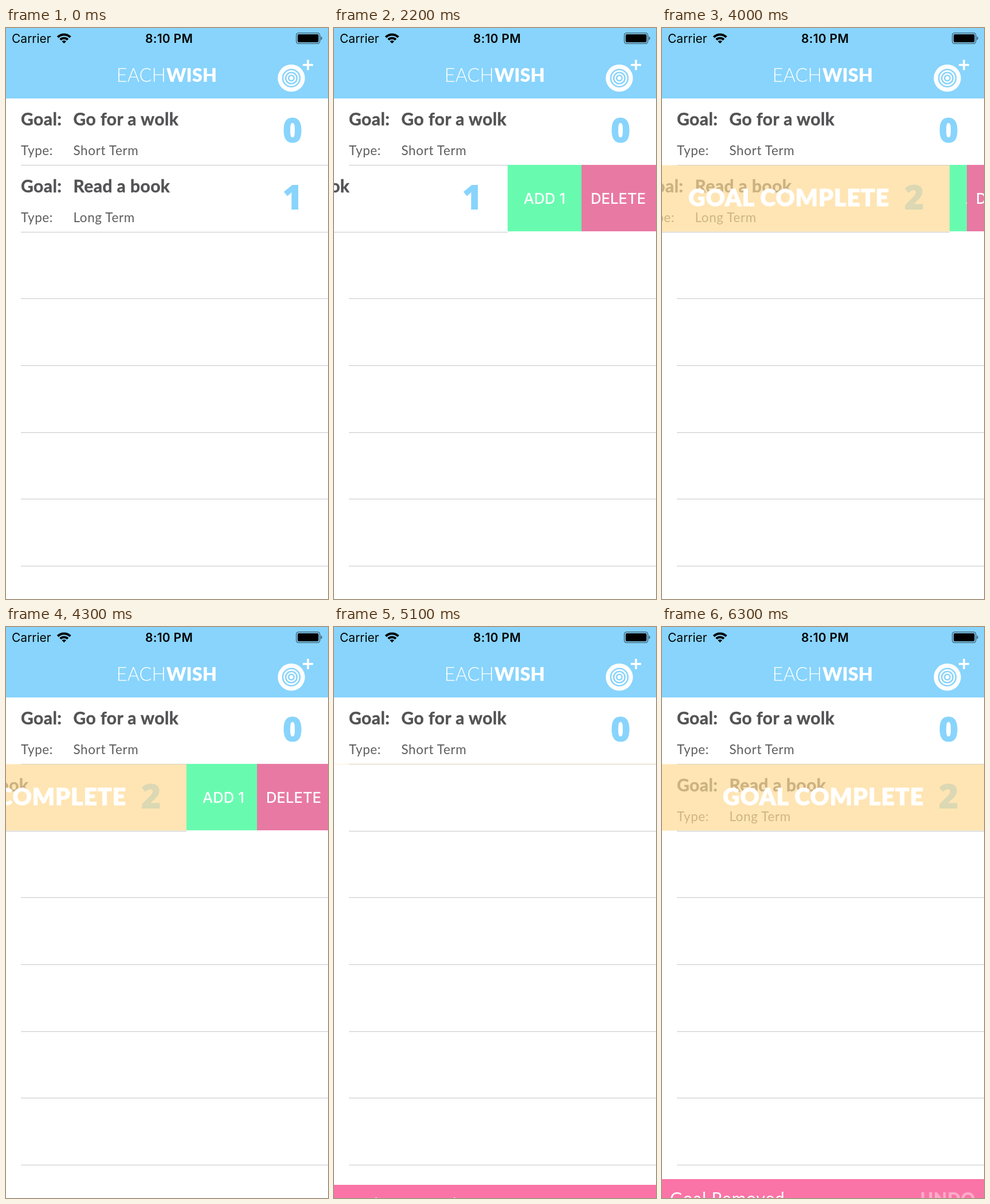
Animation of 562 by 997 pixels, one loop 6400 ms. Source, as an HTML page:

```html
<!DOCTYPE html>
<html lang="en">
<head>
<meta charset="utf-8">
<title>Goal list</title>
<style>
  html, body { margin: 0; width: 100%; height: 100%; overflow: hidden; background: #fff; }
  svg { display: block; width: 562px; height: 997px; }
  text { font-family: Lato, "Open Sans", sans-serif; white-space: pre; }
  .ui { font-family: Inter, Roboto, sans-serif; font-size: 21px; }
  .sky { fill: #88d4fc; }
  .title { font-size: 32.5px; fill: #fff; }
  .name { font-size: 30px; font-weight: 700; letter-spacing: .45px; fill: #535355; stroke: #535355; stroke-width: .5; }
  .type { font-size: 22.5px; letter-spacing: .6px; fill: #5e5e60; }
  .count { font-family: "Open Sans", "Noto Sans", sans-serif; font-size: 60px; font-weight: 800; text-anchor: middle; }
  .banner { font-size: 41px; font-weight: 900; letter-spacing: .9px; text-anchor: middle; fill: #fff; stroke: #fff; stroke-width: .9; }
  .action { font-size: 25.7px; font-weight: 500; fill: #fff; }
  .toast { font-size: 30px; letter-spacing: .8px; fill: #fff; }
  .rule { fill: #c8c7cc; }
</style>
</head>
<body>
<svg viewBox="0 0 562 997">
  <rect width="562" height="997" fill="#fff"/>
  <g id="rules"></g>

  <g id="walk"></g>
  <g id="book"></g>
  <g id="done"></g>

  <g id="cover">
    <rect id="blank" y="240" width="562" fill="#fff"/>
    <rect id="edge" class="rule" x="26" width="536" height="1"/>
  </g>

  <g id="add">
    <rect y="239" width="562" height="116" fill="#68fbb0"/>
    <text class="ui action" x="28" y="307">ADD 1</text>
  </g>
  <g id="del">
    <rect y="239" width="562" height="116" fill="#e879a3"/>
    <text class="ui action" x="16" y="307">DELETE</text>
  </g>

  <g id="toast">
    <rect y="932" width="562" height="65" fill="#fb74a7"/>
    <text class="toast" x="14" y="977">Goal Removed</text>
    <text id="undo" class="toast" x="547" y="977" text-anchor="end" font-weight="900">UNDO</text>
  </g>

  <rect class="sky" width="562" height="123"/>
  <text class="ui" x="10" y="26">Carrier</text>
  <text class="ui" x="284.5" y="26" text-anchor="middle" font-weight="600" letter-spacing=".3">8:10 PM</text>
  <g transform="translate(101.3 27)">
    <g fill="none" stroke="#000" stroke-width="4">
      <path d="M-11 -11a15.6 15.6 0 0 1 22 0"/>
      <path d="M-6.6 -6.6a9.4 9.4 0 0 1 13.2 0"/>
    </g>
    <path d="M0 0l-3.8 -3.8a5.4 5.4 0 0 1 7.6 0z"/>
  </g>
  <rect x="506.7" y="8.7" width="41" height="18.6" rx="4" fill="none" stroke="#000" stroke-opacity=".5" stroke-width="1.5"/>
  <rect x="509" y="11" width="36.5" height="14" rx="2"/>
  <path d="M549.3 14.5q2.6 1 2.6 3.5t-2.6 3.5z" fill-opacity=".5"/>
  <text class="title" x="279" y="94" text-anchor="end" font-weight="300">EACH</text>
  <text class="title" x="280" y="94" font-weight="900">WISH</text>
  <circle cx="498" cy="87.5" r="23.7" fill="#fff"/>
  <g fill="none" stroke="#88d4fc" stroke-width="2.6">
    <circle cx="498" cy="87.5" r="15"/>
    <circle cx="498" cy="87.5" r="9.8"/>
    <circle cx="498" cy="87.5" r="4.8"/>
  </g>
  <path d="M518 64.5h18M527 55.5v18" stroke="#fff" stroke-width="3.6"/>
</svg>

<script>
  const LOOP = 6400, STEP = 100, OPEN = 260, ROW = 116.65;
  const $ = id => document.getElementById(id);
  const rule = y => `<rect class="rule" x="26" y="${y}" width="536" height="1"/>`;

  const row = (dy, name, type, count) => `
    <g transform="translate(0 ${dy})">
      <text class="name" x="26" y="170">Goal:</text>
      <text class="name" x="117.5" y="170">${name}</text>
      <text class="type" x="26" y="222">Type:</text>
      <text class="type" x="117.5" y="222">${type}</text>
      <text class="count sky" x="500" y="200">${count}</text>
    </g>` + rule(239 + dy);

  // The second row's rule belongs to the row, which slides.
  $('rules').innerHTML = [2, 3, 4, 5, 6].map(i => rule(Math.round(239 + ROW * i))).join('');
  $('walk').innerHTML = row(0, 'Go for a wolk', 'Short Term', 0);
  $('book').innerHTML = row(117, 'Read a book', 'Long Term', 1);
  $('done').innerHTML = '<rect y="240" width="562" height="117" fill="#fff"/>' +
    row(117, 'Read a book', 'Long Term', 2) +
    '<rect y="239.5" width="562" height="116" fill="#ffdb94" fill-opacity=".7"/>' +
    '<text class="banner" x="281.5" y="311">GOAL COMPLETE</text>';

  const ramp = (t, start, length) => Math.min(1, Math.max(0, (t - start) / length));
  const ease = (t, start, length) => (1 - Math.cos(Math.PI * ramp(t, start, length))) / 2;
  const swipe = (t, start, first) =>
    t < start ? 0 : Math.round(OPEN - (OPEN - first) * Math.exp((start - t) / 110));

  const move = (id, x, y = 0) => $(id).setAttribute('transform', `translate(${x} ${y})`);
  const fade = (id, a) => $(id).setAttribute('opacity', a);

  function draw(t) {
    const first = swipe(t, 1600, 76);
    const second = t < 5000 ? swipe(t, 4000, 60) : 0;

    // Each action takes half the pull while opening, but closes at its own pace.
    let add = first * (1 - ease(t, 2400, 620));
    let del = first / 2 * (1 - ease(t, 2400, 777));
    if (t >= 4000) {
      add = second;
      del = second / 2;
    }
    move('add', 562 - Math.round(add));
    move('del', 562 - Math.round(del));

    move('book', -first);
    fade('book', t < 2700 ? 1 : 0);
    move('done', -second);
    fade('done', ramp(t, 2400, 300));

    const wipe = ease(t, 4600, 326);
    const edge = Math.round(239 + 117 * wipe);
    $('blank').setAttribute('height', Math.max(0, edge - 240));
    $('edge').setAttribute('y', edge);
    fade('cover', wipe > 0 ? 1 - ramp(t, 6100, 200) : 0);

    const hidden = 1 - ease(t, 4900, 500) + ease(t, 6100, 400);
    move('toast', 0, Math.round(65 * hidden - .1));
    fade('undo', t < 6100 ? 1 : .4);
  }

  function tick(now) {
    draw(Math.floor(now % LOOP / STEP) * STEP);
    requestAnimationFrame(tick);
  }
  draw(0);
  requestAnimationFrame(tick);
</script>
</body>
</html>
```
